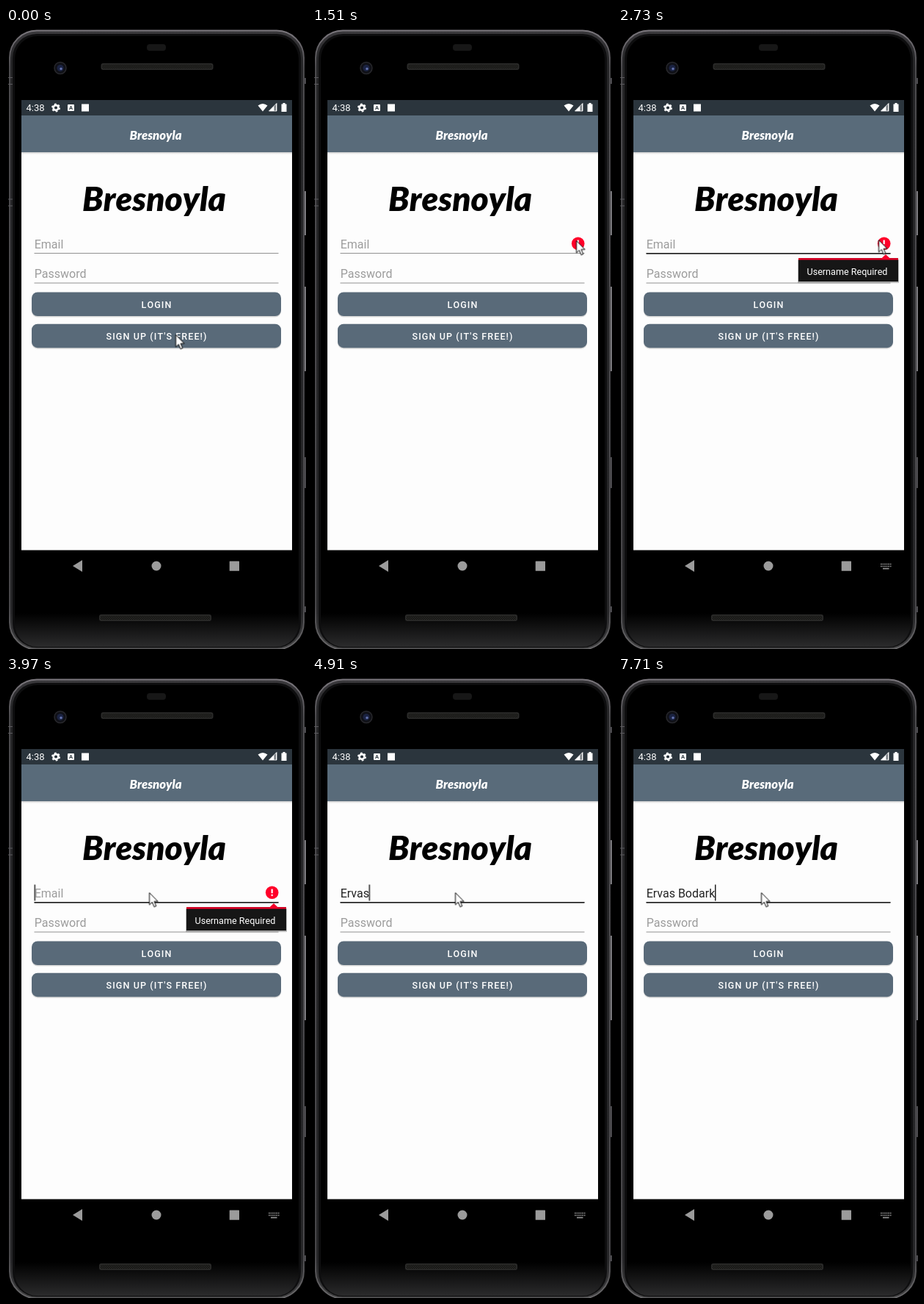
Animation of 409x845 px, one loop 8 s. Source, as an HTML page:

```html
<!DOCTYPE html>
<html lang="en">
<head>
<meta charset="utf-8">
<title>Login screen</title>
<style>
  html, body { margin: 0; width: 100%; height: 100%; overflow: hidden; background: #000; }
  svg { display: block; width: 100vw; height: 100vh; font: 16px Roboto, sans-serif; font-kerning: none; }
  .brand { font-family: Lato, sans-serif; font-weight: 900; font-style: italic; text-anchor: middle; }
  .label { font-size: 12.5px; font-weight: 500; letter-spacing: 1.12px; fill: #fff; }
  .hint { fill: #9c9c9c; }
  .grey { fill: #9b9b9b; }

  /* Every change is a hard step on one shared 8 s clock. */
  .anim { animation: 8s step-end infinite; }
  #pointer { animation-name: pointer; }
  #ripple { animation-name: ripple; }
  #error { animation-name: error; }
  #popup { animation-name: popup; }
  #keyboard { animation-name: keyboard; }
  #focus-line { animation-name: focus; }
  #email-hint { animation-name: hint; }
  #typing { animation-name: typing; }
  #caret { animation-name: blink; }

  @keyframes pointer {
    0% { transform: translate(231.5px, 417.5px); }
    1.875% { transform: translate(230.5px, 417.5px); }
    13.625% { transform: translate(229.5px, 394.5px); }
    15.375% { transform: translate(271.5px, 308.5px); }
    17% { transform: translate(330.5px, 292.5px); }
    18.875% { transform: translate(360.5px, 289.5px); }
    29.125% { transform: translate(358.5px, 289.5px); }
    34.125% { transform: translate(355.5px, 288.5px); }
    35.625% { transform: translate(310.5px, 285.5px); }
    37.125% { transform: translate(239.5px, 283.5px); }
    39% { transform: translate(196.5px, 292.5px); }
    42.375%, 100% { transform: translate(195.5px, 293.5px); }
  }
  @keyframes ripple {
    0% { opacity: 0; }
    1.875% { opacity: .05; }
    4.875% { opacity: .07; }
    13.625%, 100% { opacity: 0; }
  }
  @keyframes error {
    0% { opacity: 0; }
    3.375% { opacity: 1; }
    51.125%, 100% { opacity: 0; }
  }
  @keyframes popup {
    0% { opacity: 0; }
    25.75% { opacity: .6; }
    27.25% { opacity: 1; }
    51.125% { opacity: .6; }
    52.625%, 100% { opacity: 0; }
  }
  @keyframes keyboard { 0% { opacity: 0; } 25.75%, 100% { opacity: 1; } }
  @keyframes focus { 0% { opacity: 0; } 23.875%, 100% { opacity: 1; } }
  @keyframes hint { 0% { opacity: 1; } 51.125%, 100% { opacity: 0; } }
  @keyframes typing {
    0% { transform: translateX(38.5px); }
    51.125% { transform: translateX(47.5px); }
    54.625% { transform: translateX(53.2px); }
    56.375% { transform: translateX(61.2px); }
    59.625% { transform: translateX(69.6px); }
    61.375% { transform: translateX(77.5px); }
    77.25% { transform: translateX(81.5px); }
    79.125% { transform: translateX(91.7px); }
    80.625% { transform: translateX(100.8px); }
    91.125% { transform: translateX(109.8px); }
    93% { transform: translateX(118.5px); }
    94.875% { transform: translateX(123.8px); }
    96.375%, 100% { transform: translateX(132px); }
  }
  @keyframes blink {
    0% { opacity: 0; }
    25.75% { opacity: 1; }
    30.625% { opacity: 0; }
    37.125% { opacity: 1; }
    44.25% { opacity: 0; }
    49.625% { opacity: 1; }
    68.75% { opacity: 0; }
    73.75% { opacity: 1; }
    87.625% { opacity: 0; }
    91.125%, 100% { opacity: 1; }
  }
</style>
</head>
<body>
<svg viewBox="0 0 409 845">
  <defs>
    <linearGradient id="rim" x2="0" y2="1">
      <stop stop-color="#7b777d"/><stop offset=".06" stop-color="#4c4b4e"/>
      <stop offset=".93" stop-color="#48474a"/><stop offset="1" stop-color="#6a696b"/>
    </linearGradient>
    <linearGradient id="bezel" x2="0" y2="1">
      <stop stop-color="#3b3a3d"/><stop offset=".05" stop-color="#252527"/>
      <stop offset=".94" stop-color="#262628"/><stop offset="1" stop-color="#414142"/>
    </linearGradient>
    <linearGradient id="face" x2="0" y2="1">
      <stop offset=".945" stop-color="#000"/><stop offset="1" stop-color="#2b2b2c"/>
    </linearGradient>
    <linearGradient id="shade" x2="0" y2="1">
      <stop stop-color="#000" stop-opacity=".18"/><stop offset="1" stop-color="#000" stop-opacity="0"/>
    </linearGradient>
    <pattern id="mesh" width="3" height="3" patternUnits="userSpaceOnUse">
      <rect width="3" height="3" fill="#292927"/>
      <path d="M0 0h1.4v1.4H0zM1.5 1.5h1.4v1.4H1.5z" fill="#11110f"/>
    </pattern>
    <g id="speaker">
      <rect width="153" height="9" rx="3" fill="#2b2b2a"/>
      <rect x="1.5" y="1.5" width="150" height="6" rx="2" fill="url(#mesh)"/>
    </g>
    <g id="button">
      <rect y="1" width="340" height="33" rx="8" fill="#000" opacity=".14"/>
      <rect width="340" height="32.5" rx="8" fill="#596a79"/>
    </g>
  </defs>

  <!-- Phone body -->
  <rect width="409" height="845"/>
  <g fill="#77767a">
    <rect x="406" y="222" width="3" height="60"/><rect x="406" y="352" width="3" height="115"/>
    <rect x="406.5" y="584" width="2.5" height="42" fill="#49484c"/>
    <rect x="406.5" y="787" width="2.5" height="8" fill="#49484c"/>
    <rect x="406.5" y="68" width="2.5" height="8" fill="#49484c"/>
  </g>
  <rect x="5" y="3.5" width="401" height="842" rx="37" fill="url(#bezel)" stroke="url(#rim)" stroke-width="2"/>
  <rect x="9" y="8" width="393" height="835" rx="33" fill="#0e0e0f"/>
  <rect x="12" y="11" width="387" height="831" rx="31" fill="url(#face)"/>
  <path d="M3 67.500h6m-6 9h6M3 233h6m-6 9h6M85 4.500h12m215 0h12" stroke="#5b5a5e" fill="none"/>
  <rect x="192" y="22" width="26" height="9" rx="4" fill="#171717"/>
  <circle cx="74" cy="54.500" r="8" fill="#101117" stroke="#28282c" stroke-width="1.500"/>
  <circle cx="74" cy="54.500" r="4.500" fill="#1b2342"/>
  <circle cx="75" cy="55.500" r="1.700" fill="#6473ae"/>
  <use href="#speaker" x="129.500" y="48"/>
  <use href="#speaker" x="127" y="798"/>

  <!-- Screen and bars -->
  <rect x="21" y="98" width="369" height="612.500" fill="#fdfdfd"/>
  <rect x="21" y="98" width="369" height="21" fill="#2b353d"/>
  <rect x="21" y="119" width="369" height="50" fill="#596b7a"/>
  <rect x="21" y="169" width="369" height="3" fill="url(#shade)"/>
  <g fill="#fff">
    <text x="27.500" y="113" font-size="13">4:38</text>
    <circle cx="68" cy="108.500" r="3.400" fill="none" stroke="#fff" stroke-width="2.600"/>
    <circle cx="68" cy="108.500" r="5.100" fill="none" stroke="#fff" stroke-width="1.800" stroke-dasharray="2.600 2.740"/>
    <rect x="84" y="104" width="9" height="9" rx="1"/>
    <text x="88.500" y="111.300" font-size="7.500" font-weight="700" text-anchor="middle" fill="#2b353d">A</text>
    <rect x="103" y="103.500" width="10" height="10"/>
    <path d="M343.500 105.500q6.500-5 13 0L350 113.500z"/>
    <path d="M358.500 113L369 102.500V113z" opacity=".35"/>
    <path d="M358.500 113l7-7v7zM368 103.500l1-1V113h-1z"/>
    <path d="M358.500 113H369V102.500z" fill="none" stroke="#fff" stroke-width=".8"/>
    <path d="M375.500 103.500h2v-1.500h3v1.500h2V114h-7z"/>
  </g>
  <text class="brand" x="204" y="151.500" font-size="16.700" fill="#fff">Bresnoyla</text>
  <text class="brand" x="202" y="249" font-size="46">Bresnoyla</text>

  <!-- Form: the typed name is uncovered as the caret advances -->
  <text x="38.700" y="300" fill="#222">Ervas Bodark</text>
  <g id="typing" class="anim">
    <rect x=".7" y="281" width="120" height="24" fill="#fdfdfd"/>
    <rect id="caret" class="anim" y="282.500" width="1.500" height="22" fill="#222"/>
  </g>
  <text id="email-hint" class="hint anim" x="38.700" y="300">Email</text>
  <text class="hint" x="38.700" y="340">Password</text>
  <path d="M38.500 306.500H371.500M38.500 347H371.500" stroke="#919191"/>
  <rect id="focus-line" class="anim" x="38.500" y="306" width="333" height="1.700" fill="#222"/>

  <use href="#button" x="35" y="359.500"/>
  <use href="#button" x="35" y="402.700"/>
  <rect id="ripple" class="anim" x="35" y="402.700" width="340" height="32.500" rx="8" fill="#fff"/>
  <text class="label" x="184.500" y="380.700">LOGIN</text>
  <text class="label" x="136.500" y="423.800">SIGN UP (IT'S FREE!)</text>

  <g id="error" class="anim">
    <circle cx="362.700" cy="293.300" r="8.800" fill="#ff0029"/>
    <path d="M361.800 288.800h1.800v5.300h-1.800zM361.800 296h1.800v1.800h-1.800z" fill="#fff" stroke="#fff" stroke-width=".4"/>
  </g>
  <g id="popup" class="anim">
    <rect x="245" y="315" width="138" height="32" rx="1" fill="#000" opacity=".25"/>
    <rect x="246" y="313" width="136" height="32" fill="#161616"/>
    <path d="M246 313.300H359.500L365 308l5.500 5.300H382v2.200H246z" fill="#f50029"/>
    <text x="257.500" y="335.800" font-size="12.600" fill="#fff">Username Required</text>
  </g>

  <!-- Navigation bar -->
  <path class="grey" d="M91 732l13-8v16z"/>
  <circle class="grey" cx="205" cy="732" r="6.500"/>
  <rect class="grey" x="304.700" y="725.500" width="13.300" height="13.300" rx=".5"/>
  <g id="keyboard" class="anim" stroke="#929292" stroke-width="1.700" fill="none">
    <path d="M358 729.500h14.500M358 732.500h14.500" stroke-dasharray="1.700 .860"/>
    <path d="M361 735.600h8.500"/>
  </g>

  <path id="pointer" class="anim" d="M0 0V16.500l3.800-3.600 2.700 6.400 2.800-1.200-2.700-6.200h5z"
        fill="#fff" stroke="#000" stroke-width="1" stroke-linejoin="round"/>
</svg>
</body>
</html>
```
